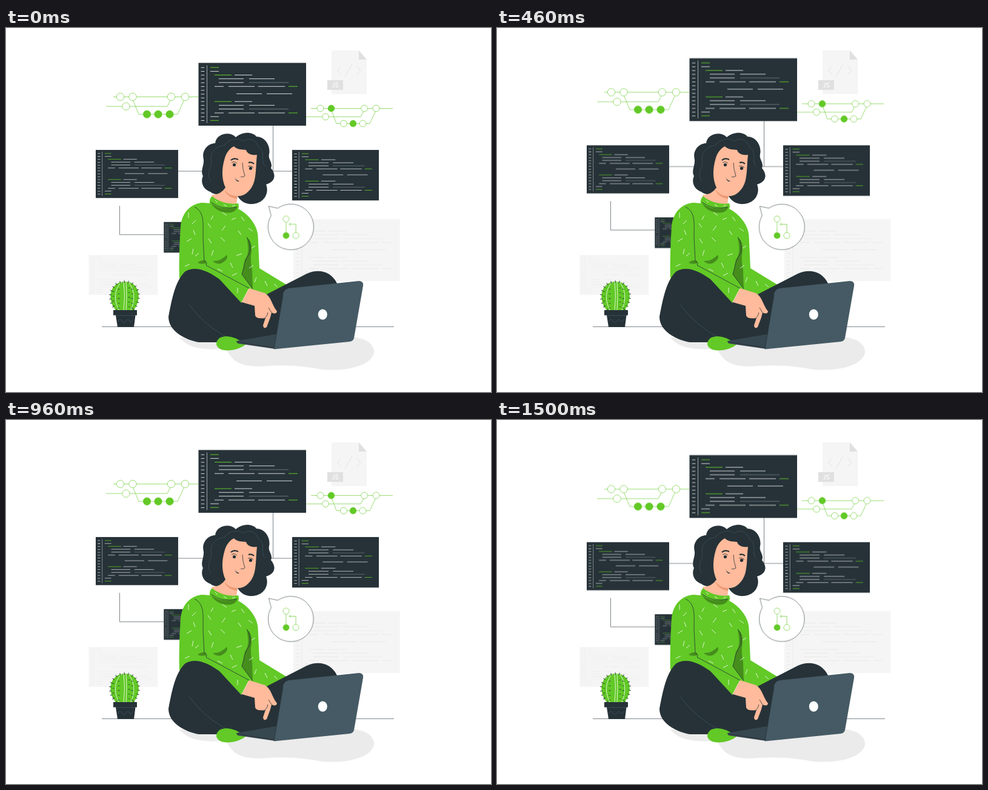
An HTML page without scripts that plays this animation: 800 by 600 pixels, repeating every 1540 ms.

```html
<!DOCTYPE html>
<html lang="en">
<head>
<meta charset="utf-8">
<title>Coding</title>
<style>
html, body { margin: 0; width: 100%; height: 100%; overflow: hidden; background: #fff; }
svg { display: block; width: 100vw; height: 100vh; --green: #62c926; --dark: #263238; }
path { fill: none; }
.screen { --bg: var(--dark); --ink: #d5d8d9; --dim: #68747a; --hi: #62c926; }
.pale { --bg: #f5f5f5; --ink: #e9e9e9; --dim: #eee; --hi: #e9e9e9; }
.graph { stroke: var(--green); stroke-width: .65; }
.graph circle { fill: #fff; }
.graph .on { fill: var(--green); }
.wire { stroke: var(--dark); stroke-width: .6; }
.detail { stroke: var(--dark); stroke-width: .8; }
.dark { fill: var(--dark); }
.green { fill: var(--green); }
.shade { fill: #458d1c; }
.skin { fill: #ffbb9b; }
.float { animation: float 1.54s linear infinite; }
.bubble { transform-origin: 469.5px 329px; animation: beat 1.54s ease-in-out infinite; }
@keyframes float {
  0% { transform: translateY(0); }
  11% { transform: translateY(-3.2px); }
  29.9% { transform: translateY(-7.6px); }
  48.5% { transform: translateY(-11.5px); }
  51.3% { transform: translateY(-10.8px); }
  62.3% { transform: translateY(-8.1px); }
  76% { transform: translateY(-4.5px); }
  97.4%, 100% { transform: translateY(.4px); }
}
@keyframes beat {
  0% { transform: scale(1.008); }
  13% { transform: scale(1.088); }
  27.6% { transform: scale(1); }
  40.3% { transform: scale(1.085); }
  65%, 100% { transform: scale(1); }
}
</style>
</head>
<body>
<svg viewBox="0 0 800 600" preserveAspectRatio="none">
  <defs>
    <g id="call">
      <path d="M26.500 0h15m8 0h43m6 0h44" stroke="var(--ink)"/>
      <path d="M148.500 0h15" stroke="var(--hi)"/>
    </g>
    <g id="block">
      <path d="M26.500 0h28" stroke="var(--hi)"/>
      <path d="M59.500 0h29M33.500 6.200h41m9 0h42M33.500 12.400h41" stroke="var(--ink)"/>
      <path d="M83.500 12.400h65" stroke="var(--dim)"/>
      <use href="#call" y="18.800"/>
    </g>
    <g id="screen">
      <path d="M0 0h177.500v103.400H0z" style="fill:var(--bg)"/>
      <path d="M14 4v95" stroke="var(--ink)" stroke-width=".7"/>
      <path d="M7 7.300V96" stroke="var(--ink)" stroke-width="5.500" stroke-dasharray="1 5.230"/>
      <path d="M19.500 7.600h14m-14 87.200h14" stroke="var(--hi)"/>
      <path d="M19.500 13.900h14m29 37h42m8 0h42m-135 37.700h14" stroke="var(--ink)"/>
      <use href="#block" y="20"/>
      <use href="#block" y="63.700"/>
    </g>
  </defs>

  <!-- backdrop -->
  <g class="screen pale">
    <use href="#screen" transform="translate(474 315) scale(.99)"/>
    <use href="#screen" transform="translate(136.500 374) scale(.64)"/>
  </g>
  <path d="M537 37h45l13 15v57h-58z" style="fill:#f5f5f5"/>
  <path d="M582 37v15h13z" style="fill:#e0e0e0"/>
  <path d="M553 63l-7 7 7 7M571 60l-12 20M578 63l7 7-7 7" stroke="#e0e0e0" stroke-width=".9"/>
  <rect x="530" y="86" width="26" height="16" fill="#e0e0e0"/>
  <text x="543.500" y="98" font-family="Lato, sans-serif" font-size="11.500" text-anchor="middle" fill="#fff">JS</text>
  <path class="wire" d="M158 492.400H640"/>

  <!-- floating screens and branches -->
  <g class="float">
    <path class="wire" d="M284 236H472M440.500 160V236M187.500 293V340.700H261"/>
    <g class="screen">
      <use href="#screen" transform="translate(317.500 57.500)"/>
      <use href="#screen" transform="translate(148 201) scale(.766)"/>
      <use href="#screen" transform="translate(472 201) scale(.806)"/>
      <use href="#screen" transform="translate(260.300 319.800) scale(.488)"/>
    </g>
    <g class="graph">
      <path d="M177 113.500H317M165 129.200H266L273 116M209 118L219 142.200H283L294 118"/>
      <circle cx="188.500" cy="113.500" r="6.200"/>
      <circle cx="209" cy="113.500" r="6.200"/>
      <circle cx="272.500" cy="113.500" r="6.200"/>
      <circle cx="295.500" cy="113.500" r="6.200"/>
      <circle cx="198" cy="129.200" r="6.200"/>
      <circle class="on" cx="232.500" cy="142.200" r="6.200"/>
      <circle class="on" cx="251" cy="142.200" r="6.200"/>
      <circle class="on" cx="270" cy="142.200" r="6.200"/>
    </g>
    <g class="graph">
      <path d="M503 132.500H638M495 146.300H585L591 135M537 136L545 157.500H600L610 136"/>
      <circle cx="518.500" cy="132.500" r="5.400"/>
      <circle class="on" cx="536.500" cy="132.500" r="5.400"/>
      <circle cx="591" cy="132.500" r="5.400"/>
      <circle cx="610.500" cy="132.500" r="5.400"/>
      <circle cx="527" cy="146.300" r="5.400"/>
      <circle cx="557" cy="157.500" r="5.400"/>
      <circle class="on" cx="572.500" cy="157.500" r="5.400"/>
      <circle cx="588.500" cy="157.500" r="5.400"/>
    </g>
  </g>

  <!-- speech bubble -->
  <g class="bubble">
    <path class="wire" d="M433.500 294L448.500 297.300A37.300 37.300 0 1 1 437.500 309.300Z" style="fill:#fff"/>
    <g class="graph">
      <path d="M462 320V337M478 337V323.500H467M470 320.500L467 323.500L470 326.500"/>
      <circle cx="462" cy="315" r="5"/>
      <circle class="on" cx="462" cy="342" r="5"/>
      <circle cx="478" cy="342" r="5"/>
    </g>
  </g>

  <!-- cactus -->
  <path class="green" d="M182 466C170 453 169 434 180 424C188 416 204 416 212 424C222 434 221 453 210 466Z"/>
  <path d="M187 466C177 450 179 430 190 419M194 466Q197 442 194 418M198 466Q200 442 198 418M205 466C214 450 212 430 202 419" stroke="#fff" stroke-width=".8"/>
  <path class="detail" d="M182 465C169 453 169 434 180 424C188 416 204 416 212 424C222 434 221 453 210 465" stroke-width="3.500" style="stroke-width:4;stroke-dasharray:.9 6"/>
  <path class="detail" d="M186 430V462M203 428V462M208 430V462M177 434V460" style="stroke-width:3;stroke-dasharray:.8 7"/>
  <path class="dark" d="M177 465h39v8.500h-2.500l-2.500 19.500h-27l-3-19.500h-4z"/>
  <path d="M181 474h32M184 484l4-4 6 6 7-6 4 5 5-5" stroke="#455a64" stroke-width=".7"/>

  <!-- shadow -->
  <path d="M286 510C300 528 325 531 362 529C371 538 372 558 418 558C470 554 490 558 522 563C575 567 608 551 607 532C604 514 583 508 548 508Z" style="fill:#ebebeb"/>

  <!-- hair, head -->
  <path class="dark" d="M345 190C347 173 370 170 379 180C391 170 407 171 413 179C427 179 437 194 434 208C432 217 441 222 437 231C447 243 443 254 429 258C434 270 428 288 408 290C396 291 387 286 382 277L362 264C360 275 345 277 337 270C326 266 320 255 325 244C320 235 327 227 326 217C322 202 333 190 345 190Z"/>
  <path class="skin" d="M361 214C364 204 370 198 376 195C381 201 390 200 396 201C398 208 406 210 414 209C412 226 413 245 408 257C402 271 391 278 382 277L380 291Q360 301 338 282L340 275Q354 275 362 263C356 250 355 234 361 214Z"/>
  <path d="M360 265C364 273 372 277 382 277L381 281.500C370 280 362 274 360 265Z" style="fill:#ea9a74"/>
  <path d="M338 253C328 238 342 229 338 216C338 202 350 193 360 194C368 182 384 180 391 187M391 187C402 179 413 185 416 196C429 201 419 217 427 228" stroke="#455a64" stroke-width=".6"/>
  <path class="detail" d="M371 218Q376 213.500 383 217M400 222Q405 220 409 224" style="stroke-width:2.2"/>
  <path class="detail" d="M372 222Q376 219 381 223M399 228Q404 226 408 230M390 222Q390 232 394 244Q390 247 387 245"/>
  <path class="dark" d="M377 245Q379 252 385 252Q380 256 377 245Z"/>
  <circle class="dark" cx="376.500" cy="225.500" r="2.600"/>
  <circle class="dark" cx="403.500" cy="231.300" r="2.600"/>

  <!-- sweater -->
  <path class="green" d="M340 277C349 286 369 292 383 289Q385 294 383 298C397 305 414 322 415.500 342L418 396L464 424L428 441L400 430L388 453L345 418L286 412C285 374 287 345 288 327C290 305 304 289 325 288L336 289Q335 282 340 277Z"/>
  <path class="shade" d="M338 288C349 299 367 299 382 295Q378 305 366 304.500C352 304 342 297 338 288ZM341 384Q354 385 364 374Q368 381 355 388Q347 390 341 384ZM397 345Q406 351 405 367Q402 380 406 400L407 430L389 406Q393 391 394 382Q403 373 397 345ZM316 387Q323 381 330 384V388Q322 390 316 387Z"/>
  <path class="detail" d="M311 295C328 303 325 324 325 345L327 384Q333 386 330 391L401 429M338 287Q356 301 381 295M397 345Q405 354 402 371Q393 383 392 395L389 406L407 430"/>
  <path d="M301 304v9M313 317l-6 6M309 333l3 8M298 352l8-5M309 364l-2 9M295 393l8-4M318 371l-6 5M333 322l5 7M342 309l-4 7M334 347l5 8M342 366l-3 9M354 345l7 7M362 326l-6 8M357 304l7 5M372 316l7-3M388 311l5 7M383 334l5 7M400 330l7 5M380 375l9-3M370 387l4 8M349 397l8 4M381 404l-8 4M382 428v9M413 411l-3 8M427 417l4 8M401 396l7-5M411 359l-6 4M442 422l6 5M345 284l4 4M359 291l5 3M373 294l5-2" stroke="#fff" stroke-width=".8"/>

  <!-- legs and shoe -->
  <path class="dark" d="M428 440L496 405C515 396 537 401 546 421L540 490L446 524L380 518H318C296 514 268 500 268 476C274 444 280 415 296 401C313 391 334 401 352 414L388 453L400 440Z"/>
  <path d="M302 456C322 481 341 498 367 511" stroke="#455a64" stroke-width=".7"/>
  <path class="green" d="M347 522C346 509 362 504 380 512L396 521C386 531 352 538 347 522Z"/>

  <!-- hand -->
  <path class="skin" d="M401 429L427 437C438 443 439 458 447 467Q446 473 438 469L436 477L430 493Q425 497 424 490L428 478Q413 480 411 474L410 458L389 452Z"/>
  <path class="detail" d="M427 478Q431 475 432 469M438 469L433 461"/>

  <!-- laptop -->
  <path d="M380 516L450 504L444 529L382 520Z" style="fill:#37474f"/>
  <path class="detail" d="M380 517L442 527"/>
  <path d="M467 429L582 417Q590 417 589 425L574 511Q573 516 567 517L442 529.500L457 438Q459 430 467 429Z" style="fill:#455a64"/>
  <path class="detail" d="M457 440L442 529"/>
  <ellipse cx="522.300" cy="472.200" rx="7.500" ry="8.600" fill="#fff"/>
</svg>
</body>
</html>
```
